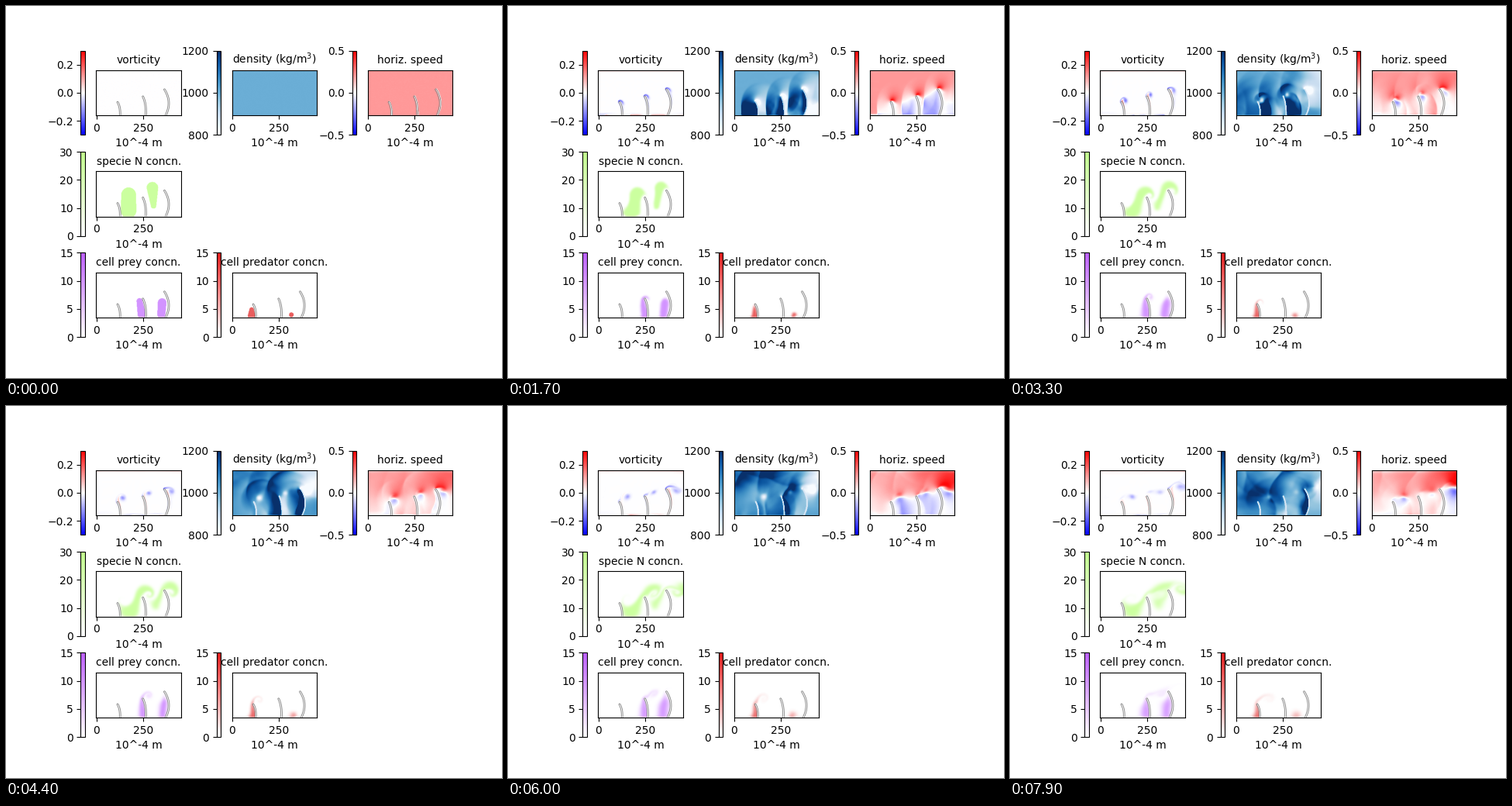
Animation of 640x480 px, one loop 8000 ms. Source, as a matplotlib script:

```python
import numpy as np
import matplotlib.pyplot as plt
from matplotlib.animation import FuncAnimation
from matplotlib.colors import LinearSegmentedColormap

FRAMES, SUBSTEPS = 80, 5
W, H = 225, 120          # lattice cells, two length units each
CELL = 109.4 / W         # panel pixels per cell
U0, VISCOSITY, DIFFUSION = 0.2, 0.04, 0.2

rng = np.random.default_rng(3)
J, I = np.meshgrid(np.arange(W), np.arange(H))
PX, PY = (J + 0.5) * CELL, (I + 0.5) * CELL


# ---- shapes, in panel pixels measured from the lower left corner
def stem_distance(base, height, lean, bow):
    t = np.linspace(0, 1, 80)
    xs = base + 4 * bow * t * (1 - t) - lean * t**3
    return np.min([np.hypot(PX - x, PY - y)
                   for x, y in zip(xs, height * t)], axis=0)


def blob(x, bottom, top, r_bottom, r_top, tilt=0):
    """Upright capsule whose radius runs from r_bottom to r_top."""
    s = np.clip((PY - bottom) / (top - bottom), 0, 1)
    d = np.hypot(PX - x - tilt * s, PY - bottom - (top - bottom) * s)
    return d < r_bottom + (r_top - r_bottom) * s


stem_dist = np.min([stem_distance(30.8, 17, 3.3, 0),
                    stem_distance(64, 24.2, 3.8, 0),
                    stem_distance(89.5, 33.3, 1.5, 4.2)], axis=0)
stem = stem_dist < 0.95
solid = stem.copy()
solid[[0, -1]] = True
fluid = ~solid

nutrient = blob(42, 8, 28, 10, 9.5) | blob(74, 14, 37, 3.5, 7.5, -1.5)
prey = blob(59, 4, 21, 5.5, 3.8, -3) | blob(84, 4, 19, 5.2, 5.6, 1)
predator = blob(24.8, 2.5, 10, 5, 3) | blob(75.8, 3.5, 3.6, 3, 3)

# ---- D2Q9 lattice Boltzmann flow with regularised collisions
CX = np.array([0, 1, 0, -1, 0, 1, -1, -1, 1])
CY = np.array([0, 0, 1, 0, -1, 1, 1, -1, -1])
WT = np.array([4 / 9] + [1 / 9] * 4 + [1 / 36] * 4)
OPP = np.array([0, 3, 4, 1, 2, 7, 8, 5, 6])
EAST, WEST = np.flatnonzero(CX > 0), np.flatnonzero(CX < 0)
OMEGA = 1 / (3 * VISCOSITY + 0.5)
STRESS = (np.outer(CX**2 - 1 / 3, CX**2) + np.outer(CY**2 - 1 / 3, CY**2)
          + 2 * np.outer(CX * CY, CX * CY))
RELAX = (1 - OMEGA) * 4.5 * WT[:, None] * STRESS


def col(v):
    return v[:, None, None]


def equilibrium(rho, ux, uy):
    cu = 3 * (col(CX) * ux + col(CY) * uy)
    return col(WT) * rho * (1 + cu + cu * cu / 2 - 1.5 * (ux**2 + uy**2))


def moments(f):
    rho = f.sum(0)
    ux = np.tensordot(CX, f, 1) / rho
    uy = np.tensordot(CY, f, 1) / rho
    cap = np.minimum(1, 0.48 / np.maximum(np.hypot(ux, uy), 1e-9))
    return rho, ux * cap, uy * cap


def flow_step(f):
    f = np.stack([np.roll(f[k], (CY[k], CX[k]), (0, 1)) for k in range(9)])
    # open ends: waves leave without being reflected
    f[EAST, 1:-1, 0] = f[EAST, 1:-1, 1]
    f[WEST, 1:-1, -1] = f[WEST, 1:-1, -2]
    bounced = f[:, solid][OPP]
    eq = equilibrium(*moments(f))
    f = eq + np.tensordot(RELAX, f - eq, 1)
    f[:, solid] = bounced
    return f


# ---- concentrations carried by the flow
def neighbours(a):
    p = np.pad(a, [(0, 0)] * (a.ndim - 2) + [(1, 1)] * 2, mode="edge")
    return (p[..., 1:-1, :-2], p[..., 1:-1, 2:],
            p[..., :-2, 1:-1], p[..., 2:, 1:-1])


def diffuse(c):
    gain = sum(is_open * (near - c) for is_open, near
               in zip(neighbours(fluid), neighbours(c)))
    return (c + DIFFUSION * gain) * fluid


def advect(c, ux, uy):
    x = np.clip(J - SUBSTEPS * ux, 0, W - 1.001)
    y = np.clip(I - SUBSTEPS * uy, 0, H - 1.001)
    x0, y0 = x.astype(int), y.astype(int)
    fx, fy = x - x0, y - y0
    low = c[:, y0, x0] * (1 - fx) + c[:, y0, x0 + 1] * fx
    high = c[:, y0 + 1, x0] * (1 - fx) + c[:, y0 + 1, x0 + 1] * fx
    return diffuse(low * (1 - fy) + high * fy)


def curl(ux, uy):
    return (np.gradient(uy, axis=1) - np.gradient(ux, axis=0)) * ~stem


def simulate():
    f = equilibrium(np.ones((H, W)),
                    U0 + 0.004 * rng.standard_normal((H, W)),
                    0.004 * rng.standard_normal((H, W)))
    c = np.stack([25 * nutrient, 10 * prey, 10.5 * predator]) * fluid
    shots = []
    for n in range(FRAMES):
        if n:
            for _ in range(SUBSTEPS):
                f = flow_step(f)
        rho, ux, uy = moments(f)
        spin = curl(ux, uy)
        if n:
            ux, uy = ux * fluid, uy * fluid
            spin = curl(ux, uy)
            c = advect(c, ux, uy)
        shown = np.where(stem, 1 - 0.14 * min(1, n / 25), rho)
        shots.append([spin, 1000 * shown, ux * ~stem, *c])
    return shots


# ---- figure
def fade_to(*rgb):
    return LinearSegmentedColormap.from_list("fade", [(1, 1, 1), rgb])


PANELS = [
    (1, "vorticity", "bwr", -0.3, 0.3),
    (2, "density (kg/m$^3$)", "Blues", 800, 1200),
    (3, "horiz. speed", "bwr", -0.5, 0.5),
    (4, "specie N concn.", fade_to(0.76, 1, 0.55), 0, 30),
    (7, "cell prey concn.", fade_to(0.74, 0.37, 1), 0, 15),
    (8, "cell predator concn.", fade_to(0.88, 0.1, 0.1), 0, 15),
]
EXTENT = (-0.5, 2 * W - 0.5, -0.5, 2 * H - 0.5)

shots = simulate()
fig = plt.figure(figsize=(6.4, 4.8), dpi=100)


def make_panel(slot, title, cmap, lo, hi, data):
    ax = fig.add_subplot(3, 3, slot)
    im = ax.imshow(data, origin="lower", extent=EXTENT, cmap=cmap,
                   vmin=lo, vmax=hi)
    if slot != 2:
        ax.contour(2 * J + 0.5, 2 * I + 0.5, stem_dist, [0.95],
                   colors="0.5", linewidths=0.6)
    ax.set(xlim=EXTENT[:2], ylim=EXTENT[2:], xticks=[0, 250], yticks=[])
    ax.set_xlabel("10^-4 m")
    ax.set_title(title, fontsize=10)
    fig.colorbar(im, ax=ax, location="left")
    return im


images = [make_panel(*p, data) for p, data in zip(PANELS, shots[0])]


def update(n):
    for im, data in zip(images, shots[n]):
        im.set_data(data)
    return images


anim = FuncAnimation(fig, update, frames=FRAMES, interval=100, repeat=True)
plt.show()
```
